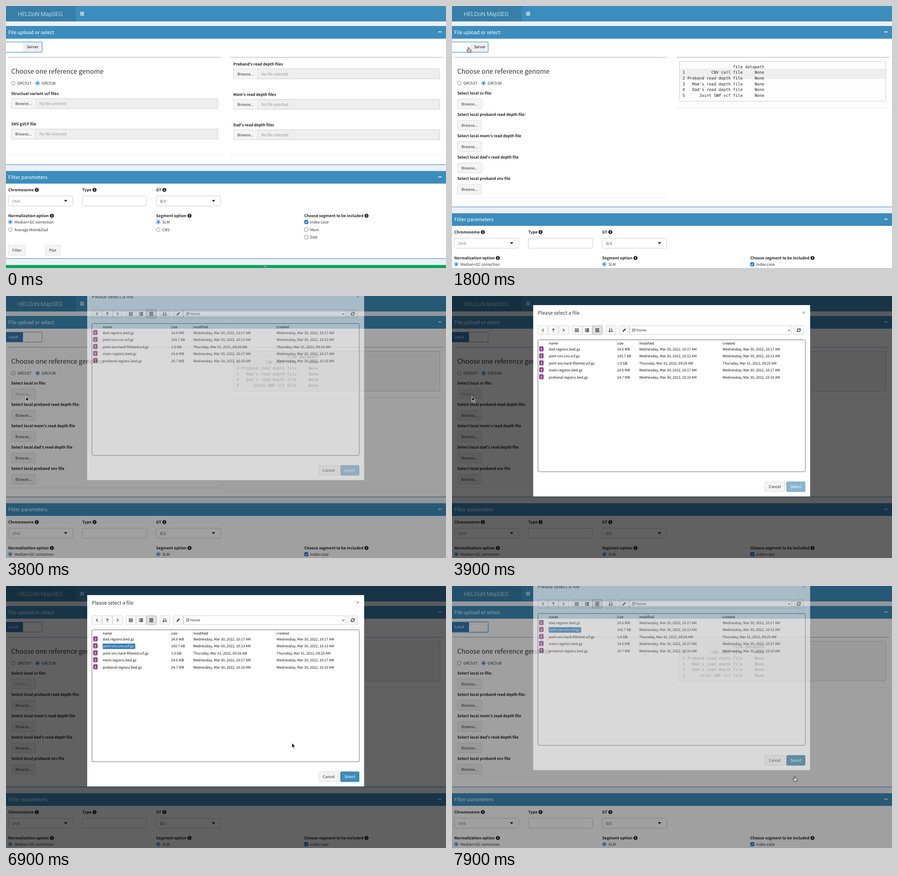
An HTML page with a canvas for the animation above (8 s loop, 970x577 px).

```html
<!DOCTYPE html>
<html lang="en">
<head>
<meta charset="utf-8">
<title>Read depth viewer</title>
<style>
  html, body { margin: 0; width: 100%; height: 100%; overflow: hidden; background: #ecf0f5; }
  canvas { display: block; width: 970px; height: 577px; }
</style>
</head>
<body>
<canvas id="stage"></canvas>
<script>
const W = 970, H = 577, LOOP = 8000, STEP = 100;
const dpr = window.devicePixelRatio || 1;

function context(canvas) {
  canvas.width = W * dpr;
  canvas.height = H * dpr;
  const c = canvas.getContext('2d');
  c.scale(dpr, dpr);
  c.textRendering = 'geometricPrecision';
  return c;
}

const stage = context(document.getElementById('stage'));
const layer = context(document.createElement('canvas'));
let ctx = stage;

const SANS = '"Noto Sans CJK JP", "Noto Sans CJK SC", "Noto Sans CJK KR", "Noto Sans CJK TC", "Noto Sans CJK", "Open Sans", sans-serif';
const MONO = '"DejaVu Sans Mono", monospace';
const BLUE = '#3c8dbc', INK = '#333', DARK = '#222';
const BODY = 8.42, TITLE = 10.85, LIST = 7.78;
const BTN = 23;

// Main events
const SWITCH = 1800, PRESS = 3600, OPEN = 3800, PICK = 6300, CONFIRM = 7700, CLOSE = 7900;

// Pointer moves: start, end, x, y
const START = [571, 572.5];
const moves = [
  [0, 500, 41.5, 70.5], [800, 1200, 36.5, 90.5], [2300, 3000, 44, 221.5],
  [3900, 4300, 287, 121.5], [4700, 4800, 286.5, 131], [5300, 5900, 278.5, 158.5],
  [5900, 6200, 272.5, 138], [6500, 7100, 755.5, 418.5]
];

// Clicks: time, how long the ring shows
const clicks = [[1400, 400], [PRESS, 100], [PICK, 200], [CONFIRM, 200]];

const files = [
  ['dad.regions.bed.gz', '24.6 MB', '10:17', '10:17'],
  ['joint-cnv.cnv.vcf.gz', '143.7 kB', '10:13', '10:13'],
  ['joint-snv.hard-filtered.vcf.gz', '1.0 GB', '09:26', '09:25'],
  ['mom.regions.bed.gz', '24.6 MB', '10:17', '10:17'],
  ['proband.regions.bed.gz', '24.7 MB', '10:10', '10:10']
];

const arrowShape = new Path2D('M0 0V10.6L2.4 8.4L4.2 12.6L6 11.8L4.2 7.7L7.4 7.5Z');
const handShape = new Path2D('M-1.1 1Q0 -.6 1.1 1V4.4L4.4 5.2Q5.8 5.6 5.5 7.5L4.7 11.6H-1.4L-3.7 7.6Q-3.8 6 -2.5 6.3L-1.1 7.6Z');

const ease = k => {
  k = Math.min(1, Math.max(0, k));
  return k * k * (3 - 2 * k);
};
const repeat = (n, fn) => { for (let i = 0; i < n; i++) fn(i); };

function rect(x, y, w, h, fill) {
  ctx.fillStyle = fill;
  ctx.fillRect(x, y, w, h);
}

function paint(fill, stroke, line) {
  if (fill) { ctx.fillStyle = fill; ctx.fill(); }
  if (stroke) { ctx.strokeStyle = stroke; ctx.lineWidth = line; ctx.stroke(); }
}

function box(x, y, w, h, fill, stroke, r = 2, line = 1) {
  ctx.beginPath();
  ctx.roundRect(x + .5, y + .5, w - 1, h - 1, r);
  paint(fill, stroke, line);
}

function disc(x, y, r, fill, stroke, line = 1) {
  ctx.beginPath();
  ctx.arc(x, y, r, 0, Math.PI * 2);
  paint(fill, stroke, line);
}

// Text is centred vertically on y
function text(s, x, y, { size = BODY, color = INK, weight = 400, align = 'left', family = SANS } = {}) {
  ctx.font = `${weight} ${size}px ${family}`;
  ctx.fillStyle = color;
  ctx.textAlign = align;
  ctx.fillText(s, x, y + size * .36);
}

function line(color, width, x, y, ...steps) {
  ctx.strokeStyle = color;
  ctx.lineWidth = width;
  ctx.beginPath();
  ctx.moveTo(x, y);
  for (const [dx, dy] of steps) ctx.lineTo(x += dx, y += dy);
  ctx.stroke();
}

// Open arrow head with its tip at x, y, turned by a (0 points right)
function chevron(x, y, a, size, color, width) {
  ctx.save();
  ctx.translate(x, y);
  ctx.rotate(a);
  line(color, width, -size, -size, [size, size], [-size, size]);
  ctx.restore();
}
const RIGHT = 0, DOWN = Math.PI / 2, LEFT = Math.PI, UP = -DOWN;

const label = (s, x, y) => text(s, x, y, { size: 8.5, weight: 700, color: DARK });

function infoLabel(s, x, y) {
  label(s, x, y);
  const ix = x + ctx.measureText(s).width + 6.8;
  disc(ix, y, 4.5, DARK);
  rect(ix - .7, y - .9, 1.5, 3.4, '#fff');
  rect(ix - .7, y - 2.9, 1.5, 1.4, '#fff');
}

function radio(s, x, y, on) {
  const color = on ? '#1a73d9' : '#777';
  disc(x, y, 4.1, '#fff', color, .9);
  if (on) disc(x, y, 2.4, color);
  text(s, x + 9, y);
}

function checkbox(s, x, y, on) {
  box(x, y - 4.5, 9, 9, on ? '#1a73d9' : '#fff', on ? '#1a73d9' : '#777', 1.5, .9);
  if (on) line('#fff', 1.3, x + 2.2, y, [1.7, 2], [2.9, -4.2]);
  text(s, x + 13, y);
}

function button(s, x, y, w, fill = '#f4f4f4', color = INK, border = '#ddd') {
  box(x, y, w, BTN, fill, border);
  text(s, x + w / 2, y + BTN / 2, { color, align: 'center' });
}

function header(s, y) {
  rect(0, y, W, 28, BLUE);
  text(s, 5, y + 13.7, { size: TITLE, color: '#fff' });
  rect(953, y + 12.2, 7, 1.8, '#fff');
}

function fileInput(s, x, y) {
  label(s, x, y - 10.5);
  box(x, y, 456, BTN, '#eee', '#ccc', 1);
  button('Browse...', x, y, 54);
  text('No file selected', x + 62, y + BTN / 2, { color: '#999' });
}

function dropdown(s, x, y, color) {
  box(x, y, 143, BTN, '#fff', '#ccc', 2.5);
  if (!s) return;
  text(s, x + 9, y + 11.8, { color });
  ctx.fillStyle = DARK;
  ctx.beginPath();
  ctx.moveTo(x + 123, y + 9.3);
  ctx.lineTo(x + 130.6, y + 9.3);
  ctx.lineTo(x + 126.8, y + 13.7);
  ctx.fill();
}

function toggle(t) {
  const cell = 42.5, y = 79, mid = y + 11.3;
  const x = -47.5 + cell * ease((t - SWITCH + 50) / 350);
  const focus = t < OPEN || t >= CLOSE;
  ctx.save();
  ctx.beginPath();
  ctx.roundRect(-5, y, 85, BTN, 2.5);
  ctx.clip();
  rect(-5, y, 85, BTN, '#fff');
  rect(x, y, cell, BTN, '#337ab7');
  text('Local', x + cell / 2, mid, { color: '#fff', align: 'center' });
  rect(x + 2 * cell, y, cell, BTN, '#eee');
  text('Server', x + 2.5 * cell, mid, { color: '#111', align: 'center' });
  ctx.restore();
  if (focus) box(-6, y - 1, 87, BTN + 2, null, 'rgba(102,175,233,.4)', 3.5, 2);
  box(-5, y, 85, BTN, null, focus ? '#66a0d4' : '#999', 2.5);
}

function serverFiles() {
  rect(5, 327.5, 469, 1, '#ececec');
  rect(495, 328.5, 469, 1, '#ececec');
  fileInput('Structual variant vcf files', 11.5, 203.5);
  fileInput('SNV gVCF file', 11.5, 270.5);
  ['Proband', 'Mom', 'Dad'].forEach((who, i) => fileInput(`${who}'s read depth files`, 501, 138 + 67 * i));
}

function localFiles(t, hover) {
  rect(5, 421.5, 469, 1, '#ececec');
  rect(495, 223.5, 469, 1, '#e6e6e6');
  const pressed = t >= PRESS && t < OPEN;
  const waiting = t >= OPEN && t < CLOSE;
  const names = ['sv file:', 'proband read depth file:', "mom's read depth file", "dad's read depth file", 'proband snv file'];
  names.forEach((name, i) => {
    const y = 204 + 47 * i;
    label('Select local ' + name, 11.5, y - 12.5);
    if (i) button('Browse...', 11.5, y, 54.5);
    else button('Browse...', 11.5, y, 54.5, pressed ? '#d4d4d4' : hover ? '#e7e7e7' : '#f4f4f4', waiting ? '#aaa' : INK);
  });
  if (pressed) box(12.5, 204.5, 52.5, 22, null, '#1f4f86', 2, 1.8);

  box(501, 121, 456, 89, t < OPEN ? '#fdfdfd' : '#f5f5f5', '#ccc');
  if (t < OPEN) rect(502, 138, 454, 22.5, '#eee');
  const mono = { size: 8.8, family: MONO, color: DARK };
  const row = (s, i) => text(s, 508.3, 133.5 + 12.68 * i, mono);
  row('file datapath'.padStart(34), 0);
  ['CNV call', 'Proband read depth', "Mom's read depth", "Dad's read depth", 'Joint SNP vcf'].forEach((name, i) => {
    row(`${i + 1} ${(name + ' file').padStart(23)}     None`, i + 1);
  });
}

function filters(y) {
  const cols = [5, 168, 331, 657.5];
  const labels = y + 98.5, options = y + 112.3, gap = 16.8;
  header('Filter parameters', y);
  rect(0, y + 28, W, 165, '#fff');
  rect(0, y + 192.2, W, 1.3, '#5b9bc9');
  ['Chromosome', 'Type', 'GT'].forEach((s, i) => {
    infoLabel(s, cols[i], y + 41.5);
    dropdown(['chr6', '', '0/1'][i], cols[i] - .3, y + 54.5, i ? INK : '#777');
  });
  infoLabel('Normalization option', cols[0], labels);
  infoLabel('Segment option', cols[2], labels);
  infoLabel('Choose segment to be included', cols[3], labels);
  ['Median+GC correction', 'Average Mom&Dad'].forEach((s, i) => radio(s, cols[0] + 4.4, options + gap * i, !i));
  ['SLM', 'CBS'].forEach((s, i) => radio(s, cols[2] + 4.7, options + gap * i, !i));
  ['index case', 'Mom', 'Dad'].forEach((s, i) => checkbox(s, cols[3], options + gap * i, !i));
  button('Filter', 4.5, y + 163, 39);
  button('Plot', 86, y + 163, 34);
  rect(0, y + 207, W, 28, '#00a65a');
}

function page(t, hover) {
  const local = t >= SWITCH;
  const bottom = local ? 442 : 349;
  rect(0, 0, W, H, '#ecf0f5');
  rect(0, 0, W, 34, BLUE);
  rect(0, 0, 153.5, 34, '#367fa9');
  text('HELDoN MapSEG', 75.5, 17, { size: 12.7, weight: 300, color: '#fff', align: 'center', family: 'Roboto, sans-serif' });
  repeat(3, i => rect(163.5, 13 + 3 * i, 8.5, 1.6, '#fff'));

  header('File upload or select', 44);
  rect(0, 72, W, bottom - 72, '#fff');
  rect(0, bottom - .2, W, 1.3, '#5b9bc9');
  toggle(t);
  for (const x of [5, 495]) rect(x, 112, 469, 1.8, '#c9ccdb');
  text('Choose one reference genome', 11.5, 143.5, { size: 14.45 });
  radio('GRCh37', 16, 170, false);
  radio('GRCh38', 69.6, 170, true);
  if (local) localFiles(t, hover);
  else serverFiles();
  filters(bottom + 14.4);
}

function toolbar() {
  const top = 65, mid = 75.2;
  const tool = (x, fill = '#f7f7f7', border = '#d8d8d8') => box(x, top, BTN, 20.5, fill, border, 1.5);
  repeat(3, i => tool(189 + 23 * i, '#fafafa'));
  repeat(3, i => i < 2 ? tool(264 + 22.5 * i) : tool(309, '#e2e2e2', '#aaa'));
  for (const x of [339, 368, 753]) tool(x);

  chevron(199, mid, LEFT, 3, '#555', 1.6);
  chevron(247.5, mid, RIGHT, 3, '#555', 1.6);
  chevron(223.5, 72, UP, 2.8, '#666', 1.5);
  rect(222.8, 72, 1.5, 7, '#666');
  repeat(3, r => {
    const y = 71.5 + 2.9 * r;
    repeat(3, c => rect(271 + 3 * c, y, 2.2, 2.1, INK));
    rect(293.5, y, 2, 2, INK);
    rect(296.4, y, 5.6, 2, INK);
  });
  repeat(4, r => {
    rect(316, 71 + 2.4 * r, 8.5, 1.4, INK);
    rect(350.5, 71 + 2.2 * r, 1.6 + r, 1.2, INK);
  });
  rect(346.9, 71, 1.2, 8, INK);
  chevron(347.5, 79.2, DOWN, 2, INK, 1.2);
  line(INK, 2.4, 376.8, 78, [5.7, -5.7]);
  line(INK, 1, 375.8, 79, [1.6, -1.6]);

  box(391, top, 358.5, 20.5, '#fff', '#ccc', 1);
  line('#444', .9, 398, 79.2, [0, -6.8], [6.2, 0], [-1.2, 5], [-4.6, 0]);
  line('#444', .9, 399.5, 74.7, [3.1, 0]);
  text('Home', 406.3, mid + .2, { size: LIST });
  chevron(743.3, 76.6, DOWN, 2.3, '#444', 1.1);

  // Reload: two half turns
  repeat(2, i => {
    ctx.save();
    ctx.translate(764.5, mid);
    ctx.rotate(Math.PI * i);
    ctx.beginPath();
    ctx.arc(0, 0, 3.4, Math.PI + .15, Math.PI + 2.65);
    paint(null, INK, 1.2);
    line(INK, 1.2, 3.7, -3.7, [0, 2.8], [-2.8, 0]);
    ctx.restore();
  });
}

function fileIcon(x, y) {
  box(x, y, 9.5, 11, '#8e4488', '#81397c', .8);
  rect(x + 4.3, y + 2.4, .9, 3.6, '#fff');
  chevron(x + 4.75, y + 6.8, DOWN, 1.5, '#fff', .9);
  rect(x + 3, y + 8, 3.5, .8, '#fff');
}

function fileList(t) {
  const small = { size: LIST, color: '#111' };
  const cols = { name: 213.3, size: 364.5, modified: 413, created: 596.8 };
  const { name: nameX, ...rest } = cols;
  box(189, 96, 590.5, 291.5, '#fff', '#666', 3);
  for (const s in cols) text(s, cols[s], 104, small);
  for (const s in rest) rect(rest[s] - 2.5, 98, 1, 12, '#ccc');
  files.forEach(([name, size, modified, created], i) => {
    const y = 117.3 + 15.35 * i;
    const day = i === 2 ? 'Thursday, Mar 31, 2022, ' : 'Wednesday, Mar 30, 2022, ';
    const picked = i === 1 && t >= PICK;
    fileIcon(192.3, y - 6.3);
    if (picked) box(212.3, y - 6.5, 73, 13, '#337ab7');
    text(name, nameX, y, { size: LIST, color: picked ? '#fff' : '#111' });
    text(size, cols.size - .5, y, small);
    text(day + modified + ' AM', cols.modified - .3, y, small);
    text(day + created + ' AM', cols.created - .3, y, small);
  });
}

function dialog(t, hover) {
  rect(179, 20, 610.5, 421.5, '#fff');
  text('Please select a file', 189.3, 36.7, { size: TITLE });
  repeat(2, i => line('#aaa', 1.4, 772.8, 34 + 5.2 * i, [5.2, 5.2 - 10.4 * i]));
  toolbar();
  fileList(t);
  button('Cancel', 689, 408.5, 45);
  const ready = t >= PICK, pressed = t >= CONFIRM && t < CLOSE;
  const fill = !ready ? '#8ab5d3' : pressed ? '#1f5a8c' : hover ? '#367fa9' : BLUE;
  button('Select', 737, 408.5, 42, fill, '#fff', ready ? '#367fa9' : '#7eabcb');
  if (pressed) {
    box(738.2, 409.7, 39.6, 20.6, null, '#dbe8f3');
    box(737, 408.5, 42, BTN, null, '#22609c', 2, 1.4);
  }
}

// The dialog fades as one layer while it slides
function modal(t, p, hover) {
  rect(0, 0, W, H, `rgba(0,0,0,${.62 * p})`);
  ctx = layer;
  ctx.clearRect(0, 0, W, H);
  dialog(t, hover);
  ctx = stage;
  ctx.globalAlpha = p;
  ctx.drawImage(layer.canvas, 0, -90 * (1 - p), W, H);
  ctx.globalAlpha = 1;
}

function pointerAt(t) {
  let [x, y] = START;
  for (const [from, to, toX, toY] of moves) {
    const k = ease((t - from) / (to - from));
    x += (toX - x) * k;
    y += (toY - y) * k;
  }
  return [x, y];
}

function pointer(x, y, hand) {
  const shape = hand ? handShape : arrowShape;
  ctx.save();
  ctx.translate(x, y);
  ctx.lineJoin = 'round';
  ctx.lineWidth = 1;
  ctx.strokeStyle = hand ? '#111' : '#fff';
  ctx.fillStyle = hand ? '#fff' : '#000';
  ctx.fill(shape);
  ctx.stroke(shape);
  if (hand) for (const dx of [1, 2.9]) rect(dx - .3, 7.5, .7, 2.3, '#111');
  ctx.restore();
}

function draw(t) {
  const [x, y] = pointerAt(t);
  const open = t >= OPEN;
  const over = (x0, y0, x1, y1) => x > x0 && x < x1 && y > y0 && y < y1;
  const onBrowse = !open && t >= SWITCH && over(12, 204, 66, 227);
  const onToggle = !open && over(0, 79, 80, 102);
  const onSelect = open && over(737, 408, 779, 432);

  page(t, onBrowse);
  if (open) modal(t, t < OPEN + STEP || t >= CLOSE ? .6 : 1, onSelect);
  for (const [at, hold] of clicks) {
    if (t >= at && t < at + hold) disc(x - .5, y + 1, 20.7, null, DARK, 1.3);
  }
  pointer(x, y, onBrowse || onToggle || onSelect);
}

function tick(now) {
  draw(Math.floor((now % LOOP) / STEP) * STEP);
  requestAnimationFrame(tick);
}
requestAnimationFrame(tick);
</script>
</body>
</html>
```
